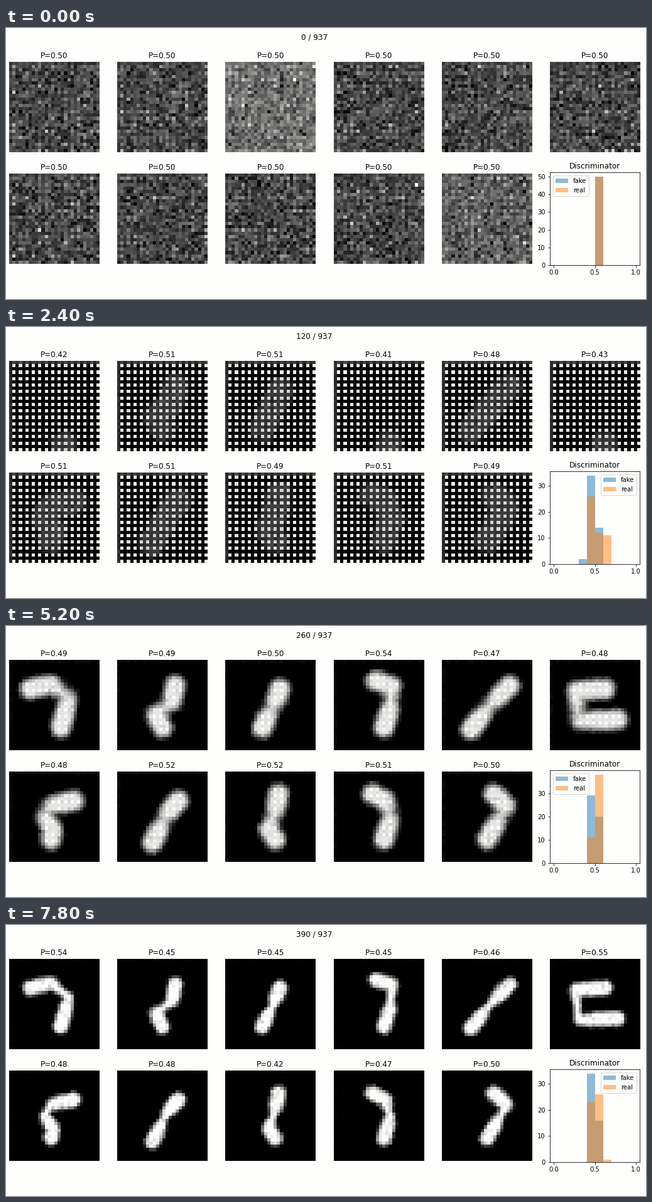
A matplotlib script that plays this animation: 1019 by 432 pixels, repeating every 8 s.

```python
import numpy as np
import matplotlib.pyplot as plt
from matplotlib.animation import FuncAnimation
from matplotlib.colors import LinearSegmentedColormap

W, H, DPI = 1019, 432, 72
FRAMES, INTERVAL = 40, 200
N, TILES = 28, 11
PAPER = "#fefefc"
STEPS = [0, 30, 80, 160, 220, 310, 390]
rng = np.random.default_rng(11)

row, col = np.mgrid[0:N, 0:N]
odd_r, odd_c = row % 2 == 1, col % 2 == 1
dots = odd_r & odd_c
border = (row == 0) | (col == 0)


def noise(sigma):
    return rng.normal(0, sigma, (TILES, N, N))


def keyed(values):
    return dict(zip(STEPS, values))


# --- scores -------------------------------------------------------------
def flat(p):
    return np.full(TILES, p)


prob = keyed([
    flat(0.50), flat(0.52), flat(0.44),
    np.array([.41, .57, .58, .39, .53, .44, .57, .57, .55, .57, .54]),
    np.array([.49, .49, .50, .53, .49, .48, .50, .52, .50, .51, .50]),
    np.array([.50, .48, .51, .55, .45, .48, .45, .51, .55, .51, .50]),
    np.array([.54, .45, .45, .45, .46, .55, .48, .48, .42, .47, .50]),
])
prob[80][[3, 5]] = 0.43


def bins(first, *counts):
    out = np.zeros(10)
    out[first:first + len(counts)] = counts
    return out


fake = keyed([bins(5, 50), bins(5, 50), bins(4, 50), bins(3, 3, 18, 29),
              bins(4, 33, 17), bins(4, 25, 24, 1), bins(4, 34, 16)])
real = keyed([bins(5, 50), bins(6, 16, 34), bins(4, 50), bins(4, 3, 25, 22),
              bins(4, 11, 39), bins(4, 12, 37, 1), bins(4, 23, 26, 1)])


# --- glyphs: one pen path per tile, drawn thinner and sharper over time ---
PATHS = [
    [(6.5, 9), (13, 7.5), (18.5, 12), (16, 21)],
    [(18, 8), (17, 13), (12, 17), (14, 21)],
    [(17, 9), (14.5, 15), (11.5, 21)],
    [(13, 6.5), (18, 8), (17.5, 15), (15.5, 21)],
    [(21, 8), (15.5, 13.5), (9, 21.5)],
    [(17, 9), (8, 9.5), (9, 19), (21, 18.5)],
    [(20, 9), (13, 10.5), (11, 14), (13.5, 18), (13, 21)],
    [(19, 9), (15.5, 13), (13, 18), (11, 22)],
    [(16.5, 7), (15.5, 12), (13.5, 18), (15.5, 21)],
    [(12, 7), (16, 9), (17.5, 14.5), (15.5, 21)],
    [(16, 7), (20, 10.5), (17, 16), (14, 21)],
]
LATE_START = [(17, 26), (17, 28)]
EMPTY = -0.4


def brush(path, radius, soft, peak, pinch):
    """Ink left by a round pen that narrows halfway along the path."""
    x, y = np.array(path, float).T
    s = np.append(0, np.cumsum(np.hypot(np.diff(x), np.diff(y))))
    u = np.linspace(0, 1, 60)[:, None, None]
    cx, cy = np.interp(u * s[-1], s, x), np.interp(u * s[-1], s, y)
    r = radius * (1 - pinch * np.exp(-((u - 0.5) / 0.18) ** 2))
    gap = (np.hypot(col + 0.5 - cx, row + 0.5 - cy) - r).min(axis=0)
    return np.clip(0.5 - gap / soft, EMPTY, peak)


def glyphs(radius, soft, peak, pinch, paths=PATHS):
    inks = [brush(p, radius, soft, peak, pinch) for p in paths]
    return np.array(inks) + noise(0.06)


blank = np.full((TILES, N, N), EMPTY)
first = [p if q > 0.5 else LATE_START for p, q in zip(PATHS, prob[160])]
field = keyed([blank, blank, blank,
               glyphs(4.6, 5.0, 0.8, 0, first),
               glyphs(3.5, 3.0, 1, 0),
               glyphs(2.6, 1.9, 1, 0.7),
               glyphs(2.2, 1.6, 1, 0.5)])


# --- background textures ------------------------------------------------
def static():
    base = flat(0.29)
    base[2], base[10] = 0.45, 0.38
    weave = 0.05 * odd_r + 0.05 * odd_c - 0.05
    spread = np.where(border, 0.07, 0.10 + 0.08 * dots)
    return base[:, None, None] + weave + spread * noise(1)


def stripes():
    tex = np.where(odd_c, np.where(odd_r, 0.04, 0.22), np.where(odd_r, 0.92, 0.76))
    edge = 0.6 - 0.15 * odd_c
    return np.where(border | (row == N - 1), edge, tex) + noise(0.035)


def lattice():
    tex = np.where(border, 0.22, np.where(dots, 1.0, 0.03))
    return tex + noise(0.02)


def faded():
    tex = np.where(dots, 0.84, 0.02)
    tex = np.where(border, 0.12 + 0.2 * odd_c, tex)
    return tex + noise(0.03) * (dots | border)


def dark(level):
    return level * border * rng.uniform(0, 1, (TILES, N, N))


back = keyed([static(), stripes(), lattice(), faded(),
              dark(0.08), dark(0.04), dark(0.02)])
ink_dot = keyed([0.55] * 4 + [1] * 3)
ink_gap = keyed([1] * 4 + [0.86, 0.96, 1])


def blend(table, step):
    k = min(np.searchsorted(STEPS, step, side="right") - 1, len(STEPS) - 2)
    a, b = STEPS[k], STEPS[k + 1]
    t = (step - a) / (b - a)
    return table[a] * (1 - t) + table[b] * t


def pictures(step):
    mask = np.clip(blend(field, step), 0, 1)
    ink = np.where(dots, blend(ink_dot, step), blend(ink_gap, step))
    return np.clip(blend(back, step) * (1 - mask) + ink * mask, 0, 1)


# --- figure -------------------------------------------------------------
plt.rcParams.update({"font.family": "DejaVu Sans", "font.size": 10,
                     "figure.facecolor": PAPER, "axes.facecolor": PAPER,
                     "toolbar": "None"})
fig, axes = plt.subplots(2, 6, dpi=DPI,
                         figsize=((W + 1e-4) / DPI, (H + 1e-4) / DPI))
fig.subplots_adjust(left=4.95 / W, right=1009.45 / W, top=0.88, bottom=0.125,
                    wspace=0.2, hspace=0.2)
gray = LinearSegmentedColormap.from_list("ink", ["#000000", PAPER])
heading = fig.text(491 / W, 0.98, "", ha="center", va="top", fontsize=12)

*panels, chart = axes.flat
images, titles = [], []
for ax in panels:
    ax.axis("off")
    images.append(ax.imshow(np.zeros((N, N)), cmap=gray, vmin=0, vmax=1,
                            interpolation="nearest"))
    titles.append(ax.set_title("", fontsize=12))

EDGES = np.linspace(0, 1, 11)
MIDS = EDGES[:-1] + 0.05


def update(i):
    step = 10 * i
    heading.set_text(f"{step} / 937")
    for im, title, pic, p in zip(images, titles, pictures(step), blend(prob, step)):
        im.set_data(pic)
        title.set_text(f"P={p:.2f}")
    chart.cla()
    for table, name in ((fake, "fake"), (real, "real")):
        chart.hist(MIDS, bins=EDGES, weights=np.round(blend(table, step)),
                   alpha=0.5, label=name)
    chart.set_xlim(-0.05, 1.05)
    chart.set_xticks([0, 0.5, 1])
    chart.set_title("Discriminator", fontsize=12)
    chart.legend(loc="best")
    return []


anim = FuncAnimation(fig, update, frames=FRAMES, interval=INTERVAL,
                     repeat=True, repeat_delay=0, blit=False)
plt.show()
```
